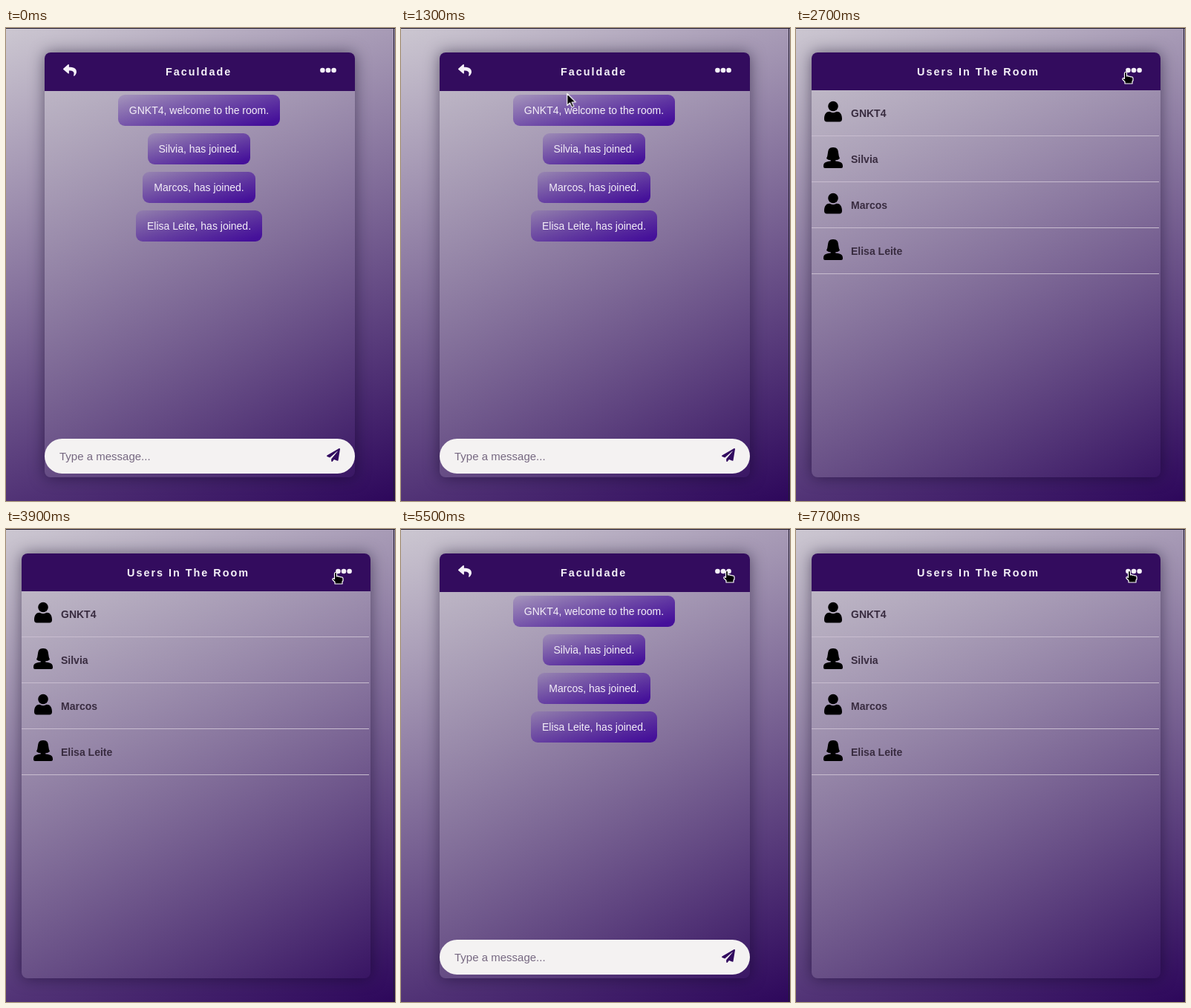
Write an HTML page that moves like this. It is 524 px wide and 638 px high and loops after 8000 ms.

```html
<!DOCTYPE html>
<html lang="en">
<head>
<meta charset="utf-8">
<title>Chat room</title>
<style>
  html, body { margin: 0; width: 100%; height: 100%; overflow: hidden; }
  body { font: 14px "Liberation Sans", Arial, sans-serif; }
  .stage {
    position: relative; width: 524px; height: 638px; overflow: hidden;
    background: linear-gradient(160deg, #ccc7d1, #2d075b);
  }
  .stage::before, .stage::after { content: ""; position: absolute; background: #211b2e; }
  .stage::before { left: 0; top: 0; width: 100%; height: 1px; }
  .stage::after { left: 522px; top: 0; width: 1px; height: 100%; }

  .panel {
    position: absolute; top: 33px; height: 573px; border-radius: 8px;
    background: linear-gradient(105deg, rgba(205, 205, 205, .2), rgba(205, 205, 205, .02));
    box-shadow: 0 0 20px rgba(10, 0, 30, .5);
    animation: 8s step-end infinite;
  }
  .chat { left: 52px; width: 418px; animation-name: chat; }
  .users { left: 21px; width: 470px; animation-name: users; }
  @keyframes chat {
    0%, 51.2%, 100% { visibility: visible; }
    31.2%, 72.45% { visibility: hidden; }
  }
  @keyframes users {
    0%, 51.2%, 100% { visibility: hidden; }
    31.2%, 72.45% { visibility: visible; }
  }

  header {
    height: 52px; border-radius: 8px 8px 0 0; background: #330c5e; color: #f5f1f8;
    font-weight: bold; font-size: 14.4px; line-height: 52px; letter-spacing: 2px; white-space: nowrap;
  }
  header span { position: absolute; left: 163px; }
  .users header { height: 51px; }
  .users header span { left: 142px; }
  svg { position: absolute; overflow: visible; }
  .reply { left: 25px; top: 15px; fill: #f5f1f8; }
  .dots { right: 25px; top: 20px; fill: #f5f1f8; }

  .note {
    width: max-content; margin: 5px auto 10px; padding: 0 15px; position: relative; left: -1px;
    line-height: 42px; border-radius: 9px; color: #f4eff8;
    background: linear-gradient(165deg, rgba(130, 100, 180, .3), #45109a 92%);
  }
  .field {
    position: absolute; left: 0; top: 521px; width: 398px; height: 47px; padding-left: 20px;
    border-radius: 24px; background: #f4f2f2; color: #766881; font-size: 15px; line-height: 48px;
  }
  .send { left: 380px; top: 13px; fill: #320b60; }

  .row {
    position: relative; width: 468px; height: 61px; line-height: 62px; padding: 0;
    border-bottom: 1px solid #c8bccf; font-weight: bold; color: #392c40;
  }
  .row span { position: absolute; left: 53px; }
  .row svg { left: 16px; top: 14px; }

  .cursor { left: 0; top: 0; animation: move 8s linear infinite; }
  .cursor path { stroke: #fff; stroke-width: 1.2; stroke-linejoin: round; animation: 8s step-end infinite; }
  .arrow { animation-name: arrow !important; }
  .hand { animation-name: hand !important; }
  @keyframes move {
    0%, 1% { transform: translate(530px, 330px); }
    4% { transform: translate(440px, 305px); }
    8% { transform: translate(310px, 255px); }
    12% { transform: translate(245px, 160px); }
    16.25% { transform: translate(223px, 88px); }
    19% { transform: translate(285px, 82px); }
    22% { transform: translate(385px, 76px); }
    25% { transform: translate(440px, 67px); }
    28%, 33.75% { transform: translate(444px, 59px); }
    46%, 58.7% { transform: translate(444px, 58px); }
    66.25%, 90% { transform: translate(439px, 56px); }
    96.25%, 100% { transform: translate(449px, 56px); }
  }
  @keyframes arrow {
    0%, 72.45% { visibility: visible; }
    23.7%, 93.7%, 100% { visibility: hidden; }
  }
  @keyframes hand {
    0%, 72.45% { visibility: hidden; }
    23.7%, 93.7%, 100% { visibility: visible; }
  }
</style>
</head>
<body>
<svg width="0" height="0">
  <defs>
    <g id="dots"><circle cx="3.4" cy="4" r="3.3"/><circle cx="11" cy="4" r="3.3"/><circle cx="18.6" cy="4" r="3.3"/></g>
    <g id="man">
      <circle cx="13" cy="7.5" r="6.8"/>
      <path d="M1 24.5C1 18 4 14.8 8.2 14.8Q13 17.5 17.8 14.8C22 14.8 25 18 25 24.5Q25 28.5 21.5 28.5H4.500Q1 28.5 1 24.500Z"/>
    </g>
    <path id="woman" d="M13 1C18.500 1 19.500 4 20 8Q20.500 13 22 16Q19.500 18.300 16.200 18.200V19.500C21 20.300 26 20.500 26 26V27Q26 29 24 29H2Q0 29 0 27V26C0 20.500 5 20.300 9.800 19.500V18.200Q6.500 18.300 4 16Q5.500 13 6 8C6.500 4 7.500 1 13 1Z"/>
  </defs>
</svg>

<div class="stage">
  <section class="panel chat">
    <header>
      <svg class="reply" width="18" height="18" viewBox="0 0 18 18"><path d="M.3 6.700L6.500 1.300Q7.900.500 7.900 2V4.800C13.500 4.900 18 6 18 11.300C18 13.500 16.600 15.600 15 16.700Q13.900 17.200 14.100 16.100C15.700 11 13.300 9.700 7.900 9.600V12.600Q7.900 14.300 6.500 13.300L.3 8Q-.3 7.300.3 6.700Z"/></svg>
      <span>Faculdade</span>
      <svg class="dots" width="22" height="8"><use href="#dots"/></svg>
    </header>
    <div class="note">GNKT4, welcome to the room.</div>
    <div class="note">Silvia, has joined.</div>
    <div class="note">Marcos, has joined.</div>
    <div class="note">Elisa Leite, has joined.</div>
    <div class="field">Type a message...
      <svg class="send" width="18" height="18" viewBox="0 0 18 18"><path d="M16.700.1L.4 9.500Q-.400 10.300.5 11L4.250 12.600L14.400 3.700Q14.900 3.600 14.700 4L6.200 14.300V17.100Q6.500 18.500 7.700 17.700L9.900 15L14.300 16.800Q15.300 17 15.500 16.200L18 1Q18-.300 16.700.1Z"/></svg>
    </div>
  </section>

  <section class="panel users">
    <header>
      <span>Users In The Room</span>
      <svg class="dots" width="22" height="8"><use href="#dots"/></svg>
    </header>
    <div class="row"><svg width="26" height="30"><use href="#man"/></svg><span>GNKT4</span></div>
    <div class="row"><svg width="26" height="30"><use href="#woman"/></svg><span>Silvia</span></div>
    <div class="row"><svg width="26" height="30"><use href="#man"/></svg><span>Marcos</span></div>
    <div class="row"><svg width="26" height="30"><use href="#woman"/></svg><span>Elisa Leite</span></div>
  </section>

  <svg class="cursor" width="16" height="20">
    <path class="arrow" d="M.5.5V16.500L4.200 13L7 19L9.600 17.800L6.900 12H12Z"/>
    <path class="hand" d="M-1.500 2Q-1.500.5 0 .5T1.500 2V6Q3.500 5 4.500 6.500Q6 5.800 7 7Q10 6.500 10 9V12L9 13V16H-1V13.500L-4 10.500Q-4.500 8.500-3 8.500L-1.500 9.500Z"/>
  </svg>
</div>
</body>
</html>
```
